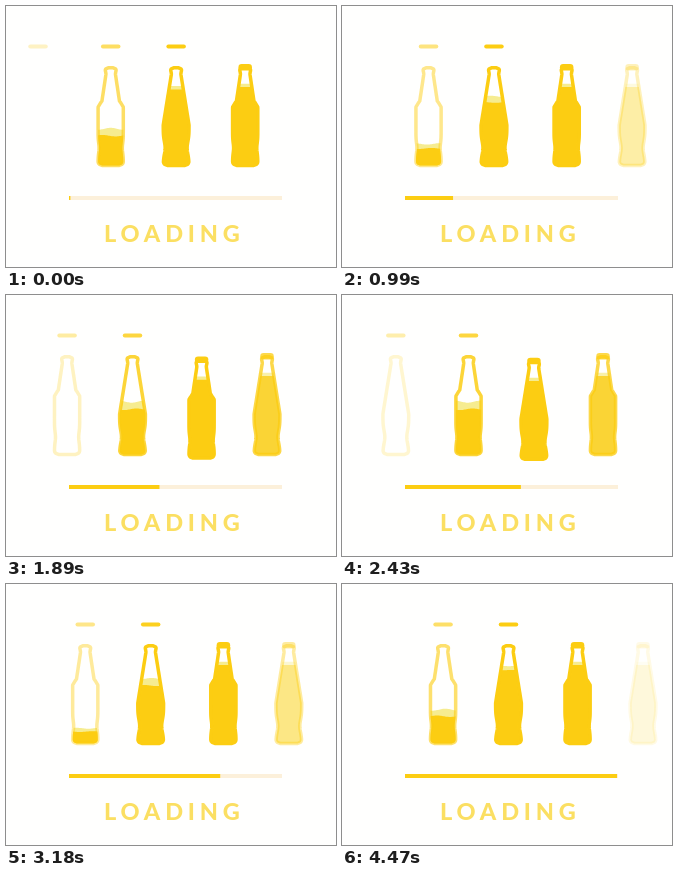
These frames come from a looping animation (330 by 261 pixels, 4.5 s). An HTML page with a canvas:

```html
<!DOCTYPE html>
<html lang="en">
<head>
<meta charset="utf-8">
<title>Loading</title>
<style>
  html, body { margin: 0; width: 100%; height: 100%; overflow: hidden; background: #fffffe; }
  canvas { display: block; width: 330px; height: 261px; }
</style>
</head>
<body>
<canvas id="stage" width="330" height="261"></canvas>
<script>
const ctx = document.getElementById('stage').getContext('2d');

const STEP = 30, TOTAL_STEPS = 150, LIFE = 75, BOTTLE_COUNT = 4;
const START_X = 32, SPEED = 3.635;
const TOP = 61.8, BASE = 159.4;
const FILL_START = 8, FILL_END = 39, CAP_FALL = 38;
const YELLOW = '#fccd12', FOAM = '#f6ec90', TRACK = '#fcf0da', LABEL = '#fbdf62', PAPER = '#fffffe';

const clamp = v => Math.min(1, Math.max(0, v));
const ramp = (v, from, to) => clamp((v - from) / (to - from));
const mix = (a, b, u) => a + (b - a) * u;
const bump = (v, centre, spread) => Math.exp(-(((v - centre) / spread) ** 2));
const corner = (depth, radius) => radius * (1 - Math.sqrt(1 - clamp(1 - depth / radius) ** 2));

// Half-width of each bottle body at height y.
const shouldered = y => 4.7 + 4.2 * ramp(y, 68, 96) + 3.7 * ramp(y, 95, 101) - bump(y, 142, 7);
const curved = y => 4.7 + 8.2 * ramp(y, 68, 119) - 1.9 * bump(y, 142, 9);

function outline(profile) {
  const halfWidth = y => profile(y) + 0.7 * bump(y, 64, 2.5)
    - corner(y - TOP, 2.5) - corner(BASE - y, 4);
  const path = new Path2D();
  const rows = 100;
  const rowY = i => mix(TOP, BASE, i / rows);
  for (let i = 0; i <= rows; i++) path.lineTo(halfWidth(rowY(i)), rowY(i));
  for (let i = rows; i >= 0; i--) path.lineTo(-halfWidth(rowY(i)), rowY(i));
  path.closePath();
  return path;
}

const shapes = [outline(curved), outline(shouldered)];
const bottles = Array.from({ length: BOTTLE_COUNT }, (_, i) => ({
  born: Math.floor(i * 18.6),
  path: shapes[i % shapes.length]
}));

function fillBelow(level, amplitude, phase, color) {
  ctx.fillStyle = color;
  ctx.beginPath();
  ctx.moveTo(-16, 165);
  for (let x = -16; x <= 16; x++) ctx.lineTo(x, level + amplitude * Math.sin(x * 0.24 + phase));
  ctx.lineTo(16, 165);
  ctx.fill();
}

function drawLiquid(path, age) {
  const filled = ramp(age, FILL_START, FILL_END);
  if (!filled) return;
  const level = mix(BASE + 1, 81, filled);
  const swell = Math.sin(Math.PI * filled);
  ctx.save();
  ctx.clip(path);
  fillBelow(level - 6 * swell - 3.2 * filled, 1.1 * swell, age * 0.55, FOAM);
  fillBelow(level, 0.8 * swell, age * 0.55 + 2, YELLOW);
  ctx.restore();
}

function drawCap(age, drop) {
  const fall = ramp(age, CAP_FALL, CAP_FALL + 3) ** 2;
  const length = mix(19.5, 13.5, fall);
  const height = mix(4, 6.5, fall);
  const y = mix(40.4, 61.2 + drop, fall);
  ctx.fillStyle = YELLOW;
  ctx.beginPath();
  ctx.roundRect(-length / 2, y - height / 2, length, height, height / 2);
  ctx.fill();
}

// Short vertical line left above the neck when the cap is pressed on.
function drawStreak(age) {
  const sinceHit = age - CAP_FALL - 3;
  if (sinceHit < 0 || sinceHit > 2) return;
  const height = 16 - 4 * sinceHit;
  ctx.fillStyle = YELLOW;
  ctx.fillRect(-2, 42 - height / 2, 4, height);
}

function drawBottle({ born, path }, step) {
  const age = (step - born + TOTAL_STEPS) % LIFE;
  const x = START_X + SPEED * age;
  const fade = 1 - ramp(x, 247, 307);
  const drop = 5 * bump(age, 43.7, 2.3);

  ctx.save();
  ctx.translate(x, 0);
  ctx.save();
  ctx.translate(0, drop);
  ctx.globalAlpha = fade;
  drawLiquid(path, age);
  ctx.globalAlpha = fade * clamp(age / 31);
  ctx.strokeStyle = YELLOW;
  ctx.lineWidth = 3.5;
  ctx.lineJoin = 'round';
  ctx.stroke(path);
  ctx.restore();
  ctx.globalAlpha = fade * mix(0.25, 1, clamp(age / 33) ** 1.2);
  drawCap(age, drop);
  drawStreak(age);
  ctx.restore();
}

function drawProgress(step) {
  ctx.fillStyle = TRACK;
  ctx.fillRect(63, 190, 213, 4);
  ctx.fillStyle = YELLOW;
  ctx.fillRect(63, 190, 212 * (step + 1) / TOTAL_STEPS, 4);
}

function drawLabel() {
  ctx.font = '800 23.5px Lato, sans-serif';
  ctx.letterSpacing = '4.8px';
  ctx.fillStyle = LABEL;
  ctx.fillText('LOADING', 98, 236);
}

const startTime = performance.now();

function render() {
  const elapsed = performance.now() - startTime;
  const step = Math.floor(elapsed / STEP + 0.01) % TOTAL_STEPS;
  ctx.fillStyle = PAPER;
  ctx.fillRect(0, 0, 330, 261);
  bottles.forEach(bottle => drawBottle(bottle, step));
  drawProgress(step);
  drawLabel();
  requestAnimationFrame(render);
}
render();
</script>
</body>
</html>
```
